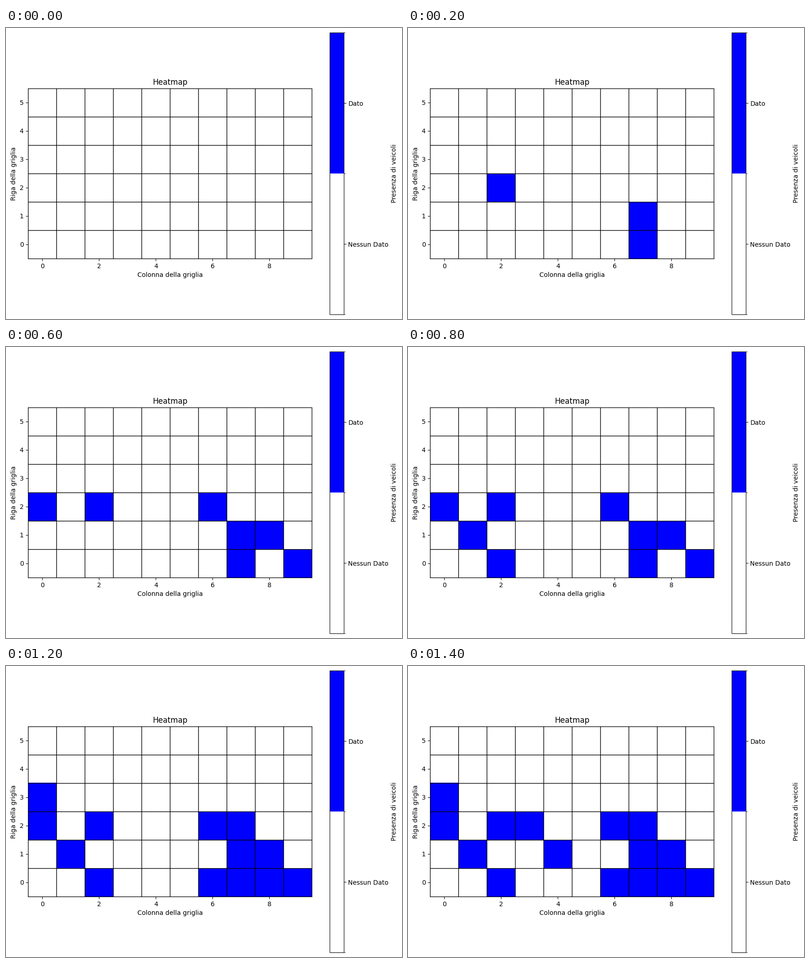
Animation of 865x636 px, one loop 1500 ms. Source, as a matplotlib script:

```python
import numpy as np
import matplotlib.pyplot as plt
from matplotlib.animation import FuncAnimation
from matplotlib.colors import BoundaryNorm, ListedColormap

W, H, DPI = 865, 636, 100
ROWS, COLS, CELL = 6, 10, 62
LEFT, BOTTOM = 48.2, 132
STEP_MS = 100

# (column, row) cells that fill at each step and stay filled
ARRIVALS = [
    [],
    [(7, 1)],
    [(7, 0), (2, 2)],
    [(6, 2)],
    [(8, 1)],
    [(0, 2)],
    [(9, 0)],
    [(1, 1)],
    [(2, 0)],
    [(8, 0)],
    [(0, 3)],
    [(7, 2)],
    [(6, 0)],
    [(3, 2)],
    [(4, 1)],
]


def add_axes(x, y, w, h):
    return fig.add_axes([x / W, y / H, w / W, h / H])


def grid_at(step):
    grid = np.zeros((ROWS, COLS))
    for cells in ARRIVALS[:step + 1]:
        for col, row in cells:
            grid[row, col] = 1
    return grid


plt.rcParams["font.family"] = "DejaVu Sans"
fig = plt.figure(figsize=(W / DPI, H / DPI), dpi=DPI, facecolor="white")
ax = add_axes(LEFT, BOTTOM, COLS * CELL, ROWS * CELL)
bar_ax = add_axes(LEFT + 658.75, 10, 30.8, 616)

cmap = ListedColormap(["white", "blue"])
norm = BoundaryNorm([0, 0.5, 1], cmap.N)
image = ax.imshow(grid_at(0), cmap=cmap, norm=norm, origin="lower",
                  aspect="auto", interpolation="nearest")

ax.set_title("Heatmap")
ax.set_xlabel("Colonna della griglia")
ax.set_ylabel("Riga della griglia")
ax.set_xticks(range(0, COLS, 2))
ax.set_yticks(range(ROWS))
ax.set_xticks(np.arange(-0.5, COLS), minor=True)
ax.set_yticks(np.arange(-0.5, ROWS), minor=True)
ax.tick_params(which="minor", length=0)
ax.grid(which="minor", color="black", linestyle="-", linewidth=1)

bar = fig.colorbar(image, cax=bar_ax, ticks=[0.25, 0.75])
bar.ax.set_yticklabels(["Nessun Dato", "Dato"])
bar.set_label("Presenza di veicoli")


def update(step):
    image.set_data(grid_at(step))
    return [image]


anim = FuncAnimation(fig, update, frames=len(ARRIVALS), interval=STEP_MS,
                     repeat=True, repeat_delay=0, blit=False)
plt.show()
```
